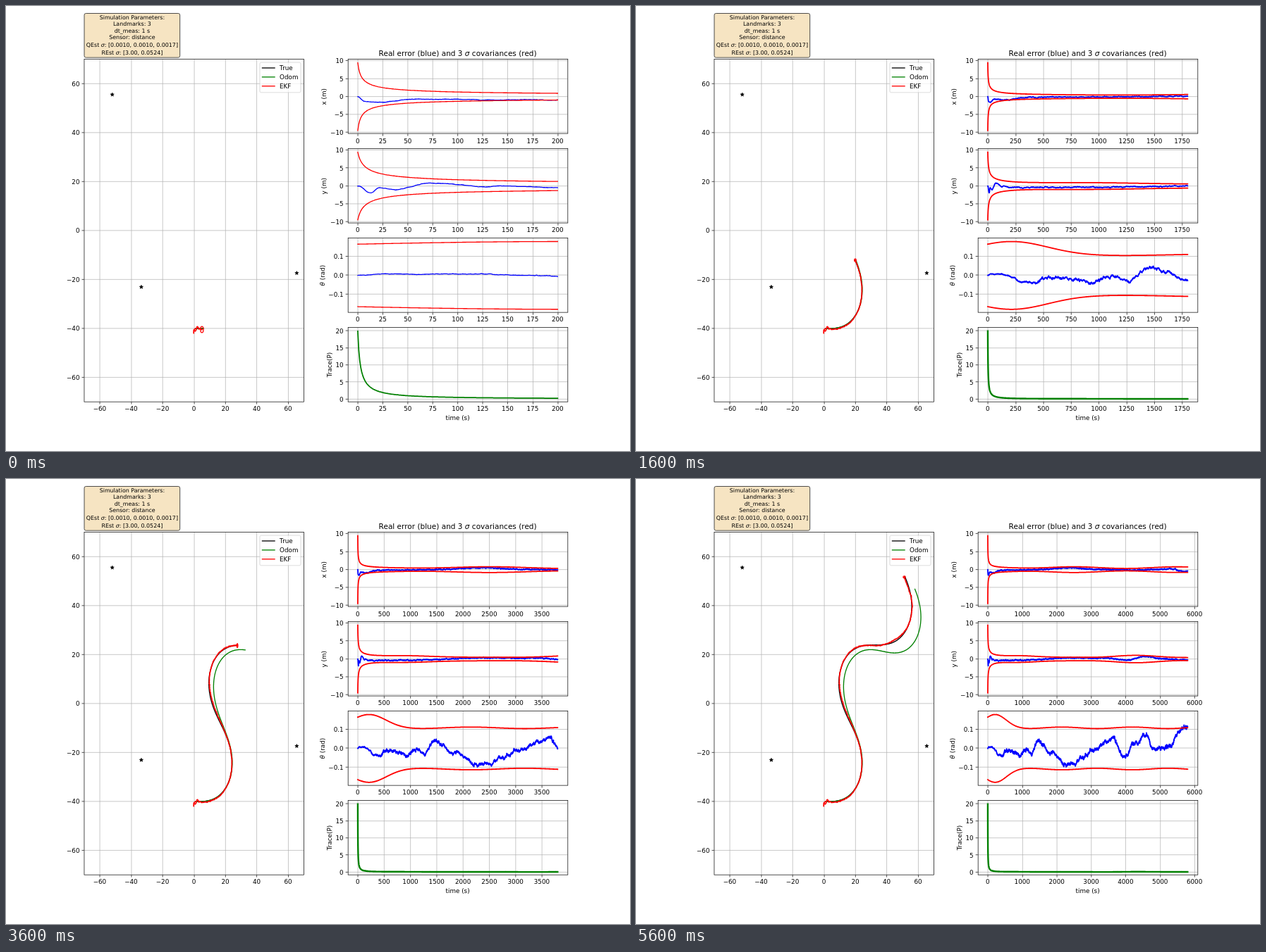
An HTML page for the animation above (5800 ms loop, 885 by 632 pixels).

```html
<!DOCTYPE html>
<html lang="en">
<head>
<meta charset="utf-8">
<title>EKF simulation</title>
<style>
  html, body { margin: 0; width: 100%; height: 100%; overflow: hidden; background: #fff; }
  svg { display: block; width: 100%; height: 100%; }
  text { font: 13.89px "DejaVu Sans", Verdana, sans-serif; fill: #000; text-anchor: middle; }
  .title { font-size: 16.67px; }
  .note text { font-size: 12.5px; }
  .end { text-anchor: end; }
  .start { text-anchor: start; }
  .it { font-style: italic; }
  .grid { stroke: #b0b0b0; stroke-width: 1.11; fill: none; }
  .rule { stroke: #000; stroke-width: 1.11; fill: none; }
  .line { fill: none; stroke-width: 2.08; stroke-linejoin: round; stroke-linecap: square; }
  .star { stroke: #000; stroke-width: 1.39; stroke-linejoin: bevel; }
</style>
</head>
<body>
<svg id="fig" viewBox="0 0 1400 1000" preserveAspectRatio="none">
  <defs></defs>
  <g id="plots"></g>
  <g class="note">
    <rect x="175.6" y="16.6" width="214.6" height="99.2" rx="3.75" fill="#f5deb3" stroke="#000" stroke-width="1.39" opacity=".8"/>
    <text x="283" y="30">Simulation Parameters:</text>
    <text x="283" y="44.8">Landmarks: 3</text>
    <text x="283" y="59.6">dt_meas: 1 s</text>
    <text x="283" y="74.4">Sensor: distance</text>
    <text x="283" y="92">QEst <tspan class="it">σ</tspan>: [0.0010, 0.0010, 0.0017]</text>
    <text x="283" y="109.5">REst <tspan class="it">σ</tspan>: [3.00, 0.0524]</text>
  </g>
  <g id="legend">
    <rect x="569.4" y="126.9" width="91.8" height="67.4" rx="2.8" fill="#fff" stroke="#ccc" stroke-width="1.39" opacity=".8"/>
  </g>
  <text class="title" x="1013.4" y="111.7">Real error (blue) and 3 <tspan class="it">σ</tspan> covariances (red)</text>
  <text transform="translate(718.9 203.7) rotate(-90)">x (m)</text>
  <text transform="translate(718.9 404.6) rotate(-90)">y (m)</text>
  <text transform="translate(714.5 605.4) rotate(-90)"><tspan class="it">θ</tspan> (rad)</text>
  <text transform="translate(730.5 806.3) rotate(-90)">Trace(P)</text>
  <text x="1013.4" y="929.7">time (s)</text>
</svg>
<script>
const END = 5800, STEP = 200, TAU = 2 * Math.PI;
const plots = document.getElementById('plots');

function add(parent, tag, attrs, text) {
  const el = document.createElementNS('http://www.w3.org/2000/svg', tag);
  for (const key in attrs) el.setAttribute(key, attrs[key]);
  if (text !== undefined) el.textContent = text;
  parent.appendChild(el);
  return el;
}
const steps = f => Array.from({ length: END + 1 }, (_, t) => f(t));
const snapX = x => Math.round(x) + .5;
const snapY = y => Math.round(y) - .5;
const minus = s => String(s).replace('-', '\u2212');

// Eases through a few [time, value] points.
function ease(...pts) {
  let i = 0;
  return steps(t => {
    while (i < pts.length - 2 && t > pts[i + 1][0]) i++;
    const [[t0, a], [t1, b]] = pts.slice(i, i + 2);
    return a + (b - a) * (1 - Math.cos(Math.PI * (t - t0) / (t1 - t0))) / 2;
  });
}

// Seeded wandering noise of unit variance; keep near 1 wanders slowly.
function wander(seed, keep) {
  let n = 0, s = seed;
  const kick = Math.sqrt(3 * (1 - keep * keep));
  return steps(t => {
    s = (s * 1664525 + 1013904223) % 4294967296;
    return n = t ? keep * n + kick * (s / 2147483648 - 1) : 0;
  });
}
const swing = (t, peak, period) => Math.cos(TAU * (t - peak) / period);

// 3-sigma bounds: the start uncertainty decays, a swinging floor builds up.
const START = 9.48;
const bound = (rate, floor) => steps(t =>
  Math.hypot(START / Math.sqrt(1 + rate * t), floor(t) * (1 - Math.exp(-t / 600))));
const sigX = bound(.52, t => .52 + .25 * swing(t, 2500, 3000));
const sigY = bound(.28, t => .35 + .65 * ((1 + swing(t, 4300, 3600)) / 2) ** 2);
const sigTh = steps(t => .108 + .004 * swing(t, 2150, 2050) + .066 * Math.exp(-(((t - 220) / 450) ** 2)));
const trace = steps(t => (sigX[t] ** 2 + sigY[t] ** 2 + sigTh[t] ** 2) / 9);

const rough = (base, noise, amp) => base.map((v, t) => v + amp * noise[t]);
const errX = rough(ease([0, 0], [7, -1.3], [20, -1.5], [62, -.6], [140, -.9], [400, -.2], [1400, 0],
  [2400, .5], [3100, .1], [4300, -.1], [5300, .2], [5700, -.5], [5800, -.35]), wander(11, .93), .08);
const errY = rough(ease([0, 0], [13, -2], [21, -.5], [38, -1], [72, .8], [130, -.1], [200, -.4], [1000, -.3],
  [2400, .3], [3400, .3], [4000, -.3], [4600, .7], [5000, .1], [5800, -.3]), wander(29, .93), .08);
const slow = wander(5, .98), fast = wander(7, .9);
const errTh = ease([0, 0], [30, .008], [130, .01], [360, -.04], [690, -.005], [930, -.045], [1105, 0],
  [1270, -.035], [1440, .04], [1850, -.025], [2330, -.09], [2900, -.025], [3640, .05], [3930, -.05],
  [4300, .035], [4580, .065], [4800, 0], [5250, .01], [5650, .11], [5800, .105])
  .map((v, t) => v + (.001 + .006 * Math.min(1, t / 500)) * slow[t] + (.001 + .002 * Math.min(1, t / 500)) * fast[t]);

// Constant speed, sinusoidal turn rate, optional heading drift.
function drive(speed, drift) {
  let x = 1, y = -40, a = 0;
  return steps(t => {
    const p = [x, y], h = a + drift[t];
    x += speed * Math.cos(h);
    y += speed * Math.sin(h);
    a += Math.PI / 1800 * Math.sin(3 * Math.PI * t / 6000);
    return p;
  });
}
const real = drive(.025, steps(() => 0));
const odom = drive(.02485, ease([0, 0], [1400, -.03], [2300, -.125], [3800, -.135], [5800, -.04]));
const ekf = real.map(([x, y], t) => [x + errX[t], y + errY[t]]);

function axes(left, top, w, h, lo, hi) {
  const id = 'clip' + plots.childElementCount;
  const clip = add(document.querySelector('defs'), 'clipPath', { id });
  add(clip, 'rect', { x: left, y: top, width: w, height: h });
  const g = add(plots, 'g', {});
  const ticks = add(g, 'g', {});
  const xTicks = add(g, 'g', {});
  const body = add(g, 'g', { 'clip-path': `url(#${id})` });
  const x0 = snapX(left), y0 = snapY(top);
  add(g, 'rect', { class: 'rule', x: x0, y: y0, width: snapX(left + w) - x0, height: snapY(top + h) - y0 });
  return { left, top, w, h, ticks, xTicks, body, y: v => top + h * (hi - v) / (hi - lo) };
}
function tickX(ax, px, label) {
  const x = snapX(px), b = ax.top + ax.h;
  add(ax.xTicks, 'path', { class: 'grid', d: `M${x} ${ax.top}V${b}` });
  add(ax.xTicks, 'path', { class: 'rule', d: `M${x} ${b}v4.86` });
  add(ax.xTicks, 'text', { x: px, y: b + 20.4 }, minus(label));
}
function tickY(ax, v, label) {
  const y = snapY(ax.y(v));
  add(ax.ticks, 'path', { class: 'grid', d: `M${ax.left} ${y}h${ax.w}` });
  add(ax.ticks, 'path', { class: 'rule', d: `M${ax.left} ${y}h-4.86` });
  add(ax.ticks, 'text', { class: 'end', x: ax.left - 9.7, y: ax.y(v) + 5.2 }, minus(label));
}
const curve = (ax, color) => add(ax.body, 'path', { class: 'line', stroke: color });

// Map
const map = axes(175, 120, 493.18, 770, -70, 70);
const mapX = v => map.left + map.w * (v + 70) / 140;
for (let v = -60; v <= 60; v += 20) {
  tickX(map, mapX(v), v);
  tickY(map, v, v);
}
for (const [x, y] of [[-52, 55.6], [-33.5, -23], [65.5, -17.3]]) {
  const pts = Array.from({ length: 10 }, (_, i) => {
    const r = i % 2 ? 1.59 : 4.17, a = i * Math.PI / 5;
    return [mapX(x) + r * Math.sin(a), map.y(y) - r * Math.cos(a)];
  });
  add(map.body, 'polygon', { class: 'star', points: pts.join(' ') });
}
const paths = [['True', '#000', real], ['Odom', 'green', odom], ['EKF', 'red', ekf]].map(([name, color, pts], i) => {
  const y = 139.2 + 20.4 * i, legend = document.getElementById('legend');
  add(legend, 'path', { class: 'line', stroke: color, d: `M575 ${y}h27.8` });
  add(legend, 'text', { class: 'start', x: 613.9, y: y + 4.9 }, name);
  return { el: curve(map, color), pts: pts.map(([x, y]) => mapX(x).toFixed(1) + ' ' + map.y(y).toFixed(1)) };
});
const blob = add(map.body, 'ellipse', { class: 'line', stroke: 'red' });

// Error charts
const ROW = 770 / 4.6;
const neg = a => a.map(v => -v);
const errorLines = (err, sig) => [[err, 'blue'], [sig, 'red'], [neg(sig), 'red']];
const rows = [
  [-10.43, 10.43, 5, 0, 2.08, errorLines(errX, sigX)],
  [-10.43, 10.43, 5, 0, 2.08, errorLines(errY, sigY)],
  [-.1953, .1953, .1, 1, 2.08, errorLines(errTh, sigTh)],
  [-.83, 21.03, 5, 0, 2.78, [[trace, 'green']]]
].map(([lo, hi, gap, digits, width, lines], i) => {
  const ax = axes(766.82, 120 + i * ROW * 1.2, 493.18, ROW, lo, hi);
  for (let n = Math.ceil(lo / gap); n * gap <= hi; n++) tickY(ax, n * gap, (n * gap + 0).toFixed(digits));
  ax.width = width;
  ax.lines = lines.map(([vals, color]) => ({ el: curve(ax, color), ys: vals.map(v => ax.y(v).toFixed(1)) }));
  return ax;
});

// Smallest round step that gives at most nine intervals.
function niceStep(span) {
  const raw = span / 9, mag = 10 ** Math.floor(Math.log10(raw));
  return mag * [1, 2, 2.5, 5, 10].find(s => s * mag >= raw);
}

function draw(T) {
  for (const { el, pts } of paths) el.setAttribute('d', 'M' + pts.slice(0, T + 1).join('L'));
  const [x, y] = ekf[T];
  blob.setAttribute('cx', mapX(x));
  blob.setAttribute('cy', map.y(y));
  blob.setAttribute('rx', sigX[T] * map.w / 140);
  blob.setAttribute('ry', sigY[T] * map.h / 140);

  const step = niceStep(1.1 * T);
  // Densely packed points make the strokes look heavier.
  const weight = 1 + .35 * Math.min(1, (T - STEP) / 800);
  for (const ax of rows) {
    const px = t => ax.left + ax.w * (t / T + .05) / 1.1;
    ax.xTicks.replaceChildren();
    for (let t = 0; t <= 1.05 * T; t += step) tickX(ax, px(t), t);
    for (const { el, ys } of ax.lines) {
      let d = '';
      for (let t = 0; t <= T; t++) d += (t ? 'L' : 'M') + px(t).toFixed(2) + ' ' + ys[t];
      el.setAttribute('d', d);
      el.style.strokeWidth = ax.width * weight;
    }
  }
  paths[2].el.style.strokeWidth = 2.5;
}

const start = performance.now();
let shown = 0;
function tick() {
  const T = STEP * (1 + Math.floor((performance.now() - start) % END / STEP));
  if (T !== shown) draw(shown = T);
  requestAnimationFrame(tick);
}
tick();
</script>
</body>
</html>
```
